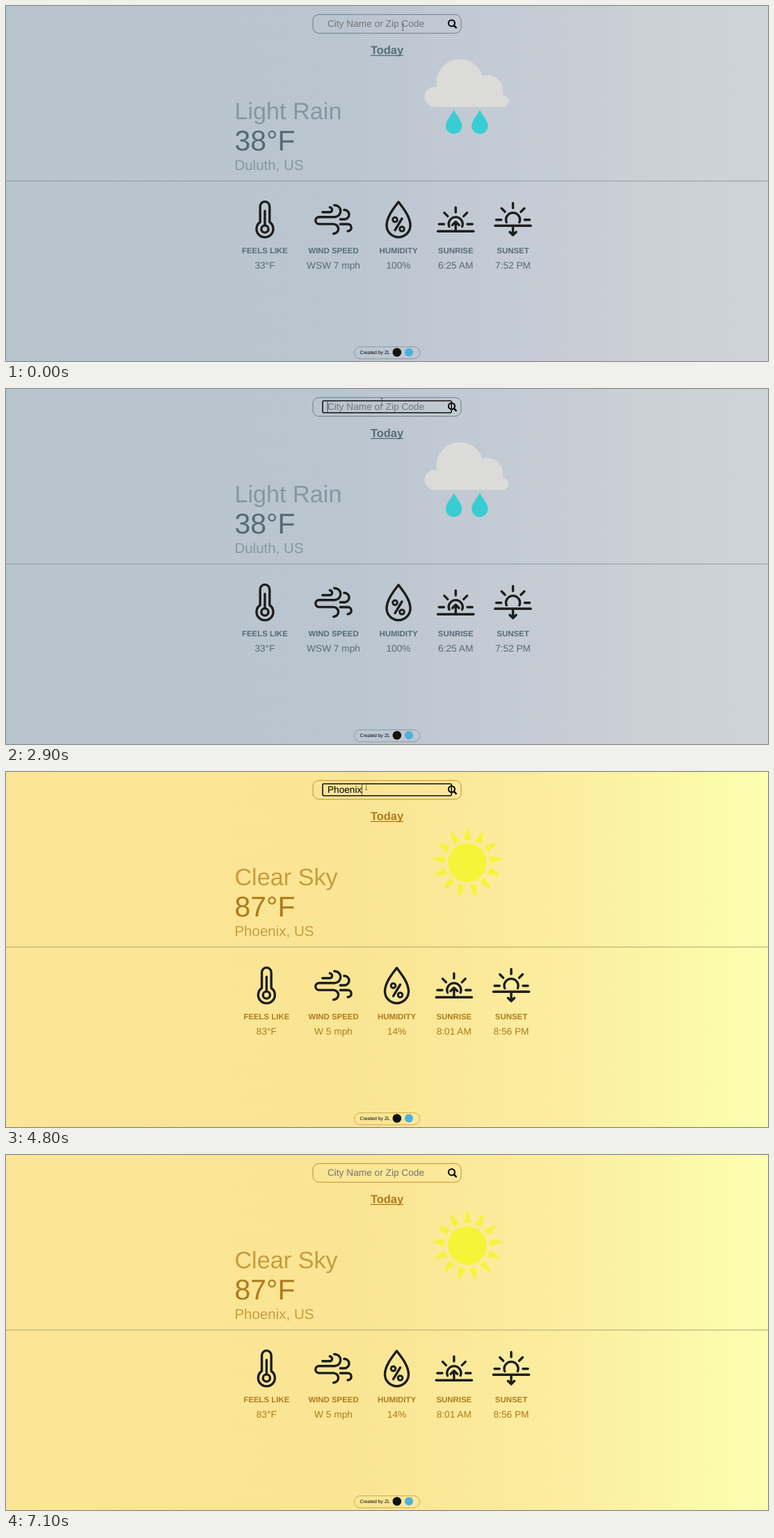
Recreate the animation shown at these times as an HTML page. Size 1095 px wide and 511 px high, loop 8 s.

```html
<!DOCTYPE html>
<html lang="en">
<head>
<meta charset="utf-8">
<title>Weather</title>
<style>
  html, body { margin: 0; width: 100%; height: 100%; overflow: hidden; }
  svg { display: block; width: 1095px; height: 511px; }
  text { font-family: "Liberation Sans", Arial, sans-serif; text-rendering: geometricPrecision; white-space: pre; }
  .mid { text-anchor: middle; }
  .bold { font-weight: bold; }
  .icon { fill: none; stroke: #1d1d1b; stroke-width: 3.4; stroke-linecap: round; stroke-linejoin: round; }
</style>
</head>
<body>
<svg id="stage" viewBox="0 0 1095 511"></svg>
<script>
const LOOP = 8000;
const CHANGE = 4800;
const stage = document.getElementById('stage');

const themes = [
  {
    id: 'rain', from: 0, ink: '#546b77', soft: '#8498a2', rule: '#8f989f', pill: '#7d8f99',
    stops: [[0, '#b8c5cd'], [.45, '#bac6cf'], [.55, '#c0c8d2'], [.78, '#c8ced6'], [.83, '#cad1d5'], [1, '#ced5d8']],
    sky: 'Light Rain', temp: '38°F', place: 'Duluth, US', art: rainCloud,
    columns: [[372, '33°F'], [470.5, 'WSW 7 mph'], [564, '100%'], [646.2, '6:25 AM'], [728.5, '7:52 PM']]
  },
  {
    id: 'sun', from: CHANGE, ink: '#b07a1c', soft: '#c89c40', rule: '#aea471', pill: '#c39a45',
    stops: [[0, '#fce695'], [.47, '#fae594'], [.75, '#fceea0'], [.9, '#fbf9a9'], [1, '#fcffb0']],
    sky: 'Clear Sky', temp: '87°F', place: 'Phoenix, US', art: sun,
    columns: [[374.4, '83°F'], [470.5, 'W 5 mph'], [561.5, '14%'], [643.8, '8:01 AM'], [726, '8:56 PM']]
  }
];

const labels = ['FEELS LIKE', 'WIND SPEED', 'HUMIDITY', 'SUNRISE', 'SUNSET'];

// Icons are drawn around x = 0.
const rays = y => `M-24 ${y}h7.2M16.8 ${y}h7.2M0 ${y - 24}v7M-16.4 ${y - 16.4}l5 5M16.4 ${y - 16.4}l-5 5
  M-9.3 ${y + 3.6}a10 10 0 1 1 18.6 0`;
const icons = [
  `<path d="M-6.8 311V288.4a6.8 6.8 0 0 1 13.6 0V311A12 12 0 1 1 -6.8 311ZM0 295V315.5"/><circle cy="321" r="5.1"/>`,
  `<path d="M-15.7 296.8H-5.5a3.5 3.5 0 0 0 .3-7M1.3 286.7a8.5 8.5 0 0 1 1 17H-20.6a5.1 5.1 0 0 0 0 10.2H.3a6.9 6.9 0 0 1 -.2 13.8
    M9.8 307H16.2a6.7 6.7 0 0 0 -.8 -13.5M9.8 314H20.8a5 5 0 0 1 -.2 10"/>`,
  `<path d="M0 282C-6 290 -17 303 -17 315.8a17 17 0 0 0 34 0C17 303 6 290 0 282ZM5 306L-5 322.6"/>
   <g stroke-width="3"><circle cx="-5" cy="307.6" r="3.3"/><circle cx="5" cy="321" r="3.3"/></g>`,
  `<path d="${rays(314)}M-25.7 324.2H25.7M0 311.5V322M-4.8 315.2L0 310.6L4.8 315.2"/>`,
  `<path d="${rays(307.7)}M-25.7 316.2H25.7M0 318V329M-4.6 325.2L0 329.8L4.6 325.2"/>`
];

function text(x, y, size, fill, content, cls = '') {
  return `<text x="${x}" y="${y}" font-size="${size}" fill="${fill}" class="${cls}">${content}</text>`;
}

function rainCloud() {
  const drop = x => `<path fill="#38cdd3" d="M${x} 149.5c-3.5 7.5-11.7 15.5-11.7 23a11.7 11.7 0 0 0 23.4 0c0-7.5-8.2-15.5-11.7-23Z"/>`;
  return `<g fill="#dbdbda"><circle cx="652.3" cy="110.5" r="34"/><circle cx="692" cy="121.5" r="22.2"/>
    <circle cx="616" cy="130.7" r="14.5"/><circle cx="713.7" cy="136.6" r="8.6"/>
    <path d="M616 116.2H652L692 122H714.2V145.2H616Z"/></g>` + drop(643.6) + drop(680.8);
}

function sun() {
  const count = 13;
  const ray = i => `<path transform="rotate(${i * 360 / count})" d="M-5 -32.8L-1.5 -48.5Q0 -50.5 1.5 -48.5L5 -32.8Q0 -33.6 -5 -32.8Z"/>`;
  return `<g transform="translate(662.8 130.6)" fill="#f7f339"><circle r="28"/>${Array.from({ length: count }, (_, i) => ray(i)).join('')}</g>`;
}

function scene(t) {
  const stops = t.stops.map(([at, color]) => `<stop offset="${at}" stop-color="${color}"/>`).join('');
  const columns = t.columns.map(([x, value], i) =>
    `<g class="icon" transform="translate(${x})">${icons[i]}</g>` +
    text(x, 356.4, 11.41, t.ink, labels[i], 'mid bold') +
    text(x, 377.7, 13.69, t.ink, value, 'mid')).join('');
  return `<g id="${t.id}">
    <linearGradient id="${t.id}-sky">${stops}</linearGradient>
    <rect width="1095" height="511" fill="url(#${t.id}-sky)"/>
    <rect x="441" y="12.3" width="213" height="26.9" rx="8.6" fill="none" stroke="${t.ink}" stroke-width=".8"/>
    ${text(547.5, 69, 16.43, t.ink, 'Today', 'mid bold')}
    <rect x="524" y="70.6" width="47" height="1.3" fill="${t.ink}"/>
    ${text(328.4, 162.5, 34.22, t.soft, t.sky)}
    ${text(328.4, 208.3, 41.06, t.ink, t.temp)}
    ${text(328.4, 236.4, 20.53, t.soft, t.place)}
    ${t.art()}
    <rect y="251.5" width="1095" height="1" fill="${t.rule}"/>
    ${columns}
    <rect x="500.4" y="490.6" width="94.2" height="17.2" rx="8.6" fill="none" stroke="${t.pill}" stroke-width=".8"/>
  </g>`;
}

stage.innerHTML = themes.map(scene).join('') + `
  ${text(508.6, 501.2, 6.84, '#000', 'Created by ZL')}
  <circle cx="561.8" cy="498.5" r="6.3" fill="#111"/>
  <circle cx="579" cy="498.5" r="6" fill="#4bb1de"/>
  <rect id="selection" x="462" y="17.8" width="49.6" height="15.8" fill="#d8302f"/>
  <text id="field" x="461.9" y="30.4" font-size="13.69"></text>
  <rect id="ring" x="455" y="17" width="185.2" height="17.2" rx="1.6" fill="none" stroke="#101010" stroke-width="1.6"/>
  <g fill="none" stroke="#000"><circle cx="640.4" cy="24.7" r="4.5" stroke-width="2.1"/>
    <path d="M643.8 28.2L646.7 31.1" stroke-width="2.6" stroke-linecap="round"/></g>
  <rect id="caret" y="18" width=".7" height="15.6" fill="#111"/>
  <path id="beam" d="M-1.7 -4.6H1.7M0 -4.6V4.6M-1.7 4.6H1.7" fill="none" stroke="#454a50" stroke-width=".7"/>
  <path id="arrow" d="M0 0V9.2L2.1 7.3L3.8 10.8L5.3 10.1L3.7 6.7H6.7Z" fill="#111" stroke="#fff" stroke-opacity=".7" stroke-width=".5"/>`;

// Pointer steps: time, shape, x, y
const pointer = [
  [0, 'beam', 570.2, 30.6], [200, 'beam', 570.2, 29.6], [600, 'beam', 576.5, 26], [700, 'beam', 572.6, 28],
  [1100, 'beam', 576, 30], [1200, 'beam', 580.5, 34], [1300, ''],
  [2300, 'arrow', 636, 80], [2500, 'arrow', 626, 62], [2600, 'beam', 600, 30], [2700, 'beam', 570, 20],
  [2800, 'beam', 545, 17], [2900, 'beam', 540, 18], [3000, 'beam', 575, 25], [3100, 'arrow', 617, 38],
  [3300, 'beam', 560, 28], [3400, 'beam', 517.6, 20.8],
  [6000, 'beam', 548, 24], [6100, 'arrow', 640, 42], [6200, 'arrow', 720, 55], [6300, '']
];

// Field steps: time, typed text, focused, caret shown, selected
const field = [
  [0, '', 0, 0, 0], [2900, '', 1, 1, 0], [3400, '', 1, 0, 0],
  [3600, 'P', 1, 1, 0], [3800, 'Pho', 1, 1, 0], [3900, 'Phoe', 1, 1, 0],
  [4100, 'Phoen', 1, 1, 0], [4200, 'Phoeni', 1, 1, 0], [4300, 'Phoenix', 1, 1, 0],
  [5700, 'Phoenix', 1, 0, 1], [5900, '', 1, 1, 0], [6900, '', 1, 0, 0], [7100, '', 0, 0, 0]
];

const el = id => document.getElementById(id);
const show = (id, on) => el(id).setAttribute('visibility', on ? 'visible' : 'hidden');
const at = (steps, time) => steps.findLast(step => step[0] <= time);

function draw(time) {
  show('rain', time < CHANGE);
  show('sun', time >= CHANGE);

  const [, typed, focused, caret, selected] = at(field, time);
  const input = el('field');
  input.textContent = typed || 'City Name or Zip Code';
  input.setAttribute('fill', selected ? '#fff' : typed ? '#000' : '#757575');
  el('caret').setAttribute('x', 461.7 + (typed ? input.getComputedTextLength() : 0));
  show('ring', focused);
  show('caret', caret);
  show('selection', selected);

  const [, shape, x, y] = at(pointer, time);
  for (const id of ['beam', 'arrow']) show(id, id === shape);
  if (shape) el(shape).setAttribute('transform', `translate(${x} ${y})`);
}

const start = performance.now();
function tick() {
  draw((performance.now() - start) % LOOP);
  requestAnimationFrame(tick);
}
tick();
</script>
</body>
</html>
```
